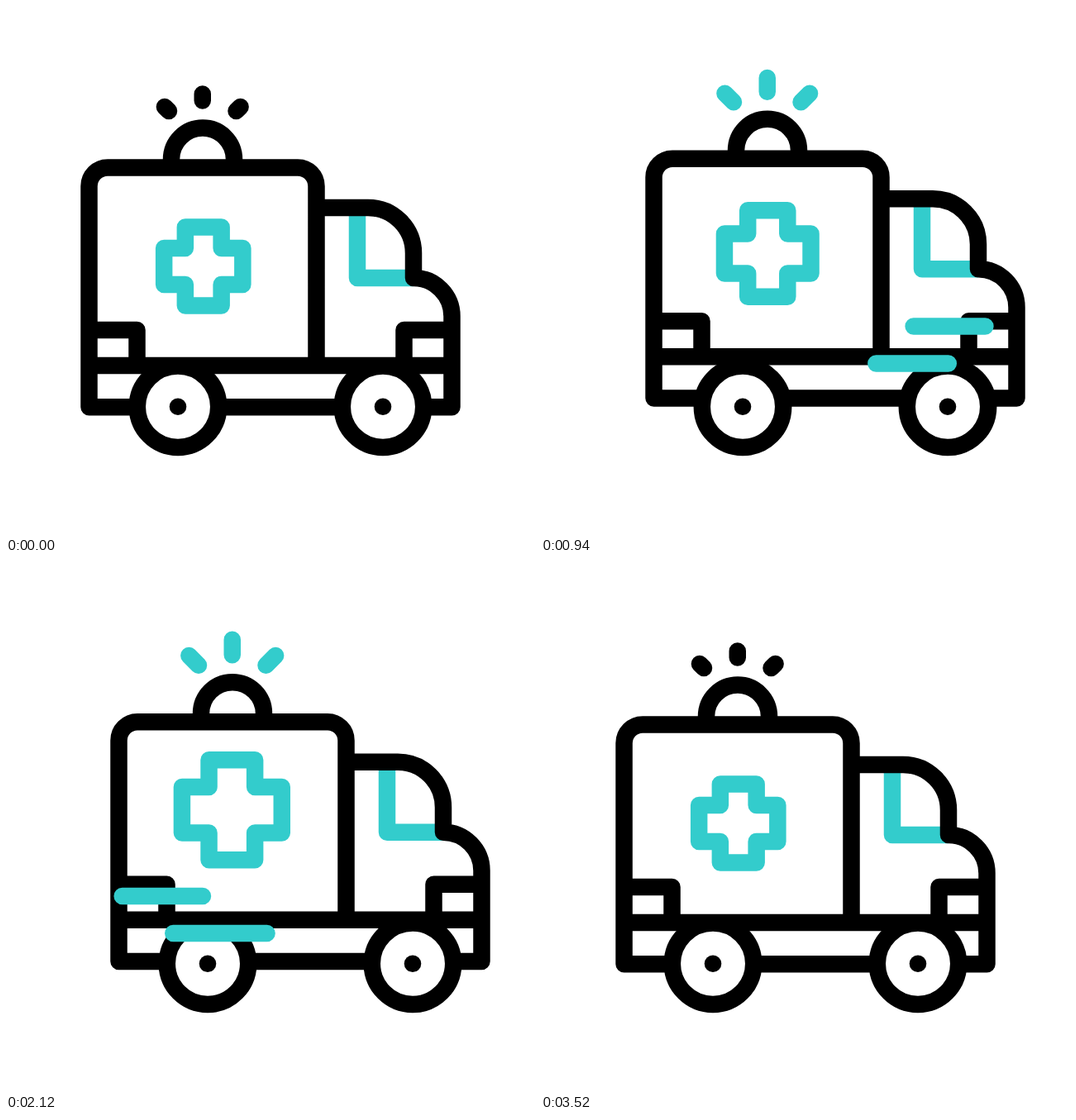
An HTML page for the animation above (3.6 s loop, 640 by 640 pixels).

```html
<!DOCTYPE html>
<html lang="en">
<head>
<meta charset="utf-8">
<title>Ambulance</title>
<style>
  html, body { margin: 0; width: 100%; height: 100%; overflow: hidden; background: #fff; }
  svg { display: block; width: 100vw; height: 100vh; }
  path, .tyre { fill: none; stroke: #000; stroke-width: 20.5; stroke-linejoin: round; }
  .tyre { fill: #fff; }
  .teal { stroke: #3cc; }
  .cap { stroke-linecap: round; }
</style>
</head>
<body>
<svg viewBox="0 0 640 640">
  <g id="body">
    <path class="teal" d="M425 244V329H493"/>
    <path class="teal" id="cross"/>
    <path d="M200 190V185.5A38 38 0 0 1 276 185.5V190"/>
    <path d="M375.5 435V218A22.5 22.5 0 0 0 353 195.5H123A22.5 22.5 0 0 0 100.5 218V485.2H539.5V376A46.5 46.5 0 0 0 493 329V299A55 55 0 0 0 438 244H375.5"/>
    <path d="M100.5 435H539.5M100.5 392H158.5V435M539.5 392H481.5V435"/>
    <path class="cap" id="rays"/>
  </g>
  <g id="wheels">
    <g id="wheel">
      <circle class="tyre" cx="208" cy="484.8" r="49.2"/>
      <circle cx="208" cy="484.8" r="10.3"/>
    </g>
    <use href="#wheel" x="248"/>
  </g>
  <path class="teal cap" id="wind"/>
</svg>
<script>
const LOOP = 3600, BEAT = 400, STOP = 7 * BEAT;
const $ = id => document.getElementById(id);
const mix = (a, b, u) => a + (b - a) * u;

function ease(u) {
  u = Math.min(1, Math.max(0, u));
  return u * u * (3 - 2 * u);
}

// Eased 0 to 1 between two times
const span = (t, from, to) => ease((t - from) / (to - from));

// Eased swing 0, 1, 0, ... that turns every half period
function wave(t, half) {
  const u = (t / half) % 2;
  return ease(u < 1 ? u : 2 - u);
}

function driveAt(t) {
  return -59 * span(t, 0, BEAT) + 95 * span(t, BEAT, 2 * BEAT) - 36 * span(t, STOP, STOP + 600);
}

function bounceAt(t) {
  return t > BEAT && t < STOP ? -15 * wave(t - BEAT, BEAT) : 0;
}

// The cross grows from a point on its lower edge
function crossPath(t) {
  const grow = t < STOP ? wave(t, BEAT) : 1 - span(t, STOP, STOP + 600);
  const s = 1 + 0.345 * grow, cx = 244 - 5.25 * s, cy = 363 - 48 * s;
  const a = 21.9 * s, b = 47.6 * s;
  return `M${cx - a} ${cy - b}h${2 * a}v${b - a}h${b - a}v${2 * a}h${a - b}v${b - a}` +
    `h${-2 * a}v${a - b}h${a - b}v${-2 * a}h${b - a}Z`;
}

function rayPath(tail, head) {
  if (head - tail < 0.005) return "";
  return [-1, 0, 1].map(side => {
    const x = 237.75 + 40.75 * side, y = side ? 127 : 114.5;
    const dx = 17 * side, dy = side ? -17 : -27;
    return `M${x + dx * tail} ${y + dy * tail}L${x + dx * head} ${y + dy * head}`;
  }).join("");
}

function drawRays(t) {
  const flashing = t >= 500 && t < 3200;
  const dip = t > 2 * BEAT && t < STOP ? 0.48 * wave(t, BEAT / 2) : 0;
  const head = span(t, 600, 2 * BEAT) - dip;
  const tail = span(t, STOP, STOP + 360);
  const rest = 0.3 * (1 - span(t, 0, 200) + span(t, 3250, 3500));
  $("rays").setAttribute("stroke", "#000");
  $("rays").style.stroke = flashing ? "#3cc" : "#000";
  $("rays").setAttribute("d", flashing ? rayPath(tail, head) : rayPath(0, rest));
}

// A streak enters at its right end and runs left; its tail follows
function streak(age, x, y, run, delay) {
  const head = span(age, 0, BEAT), tail = span(age, delay, delay + BEAT);
  return head - tail < 0.002 ? "" : `M${x - run * tail} ${y}H${x - run * head}`;
}

// Two streaks, the lower one set off sideways
function gust(age, x, y, run, shift) {
  return streak(age, x, y, run, 105) +
    streak(age, x + shift, y + 45, run + 0.2 * shift, 114);
}

function windPath(t) {
  return gust(t - 60, 442.5, 382, 362, 76.5) +
    gust(t - 800, 545, 387.5, 331, -48) +
    gust(t - 1760, 493, 403, 362, 76.5) +
    gust(t - 2800, 436, 336.5, 274, -43);
}

function draw(t) {
  const x = driveAt(t);
  $("body").setAttribute("transform", `translate(${x} ${bounceAt(t)})`);
  $("wheels").setAttribute("transform", `translate(${x} 0)`);
  $("cross").setAttribute("d", crossPath(t));
  drawRays(t);
  $("wind").setAttribute("d", windPath(t));
}

const begin = performance.now();
function tick() {
  draw((performance.now() - begin) % LOOP);
  requestAnimationFrame(tick);
}
draw(0);
requestAnimationFrame(tick);
</script>
</body>
</html>
```
